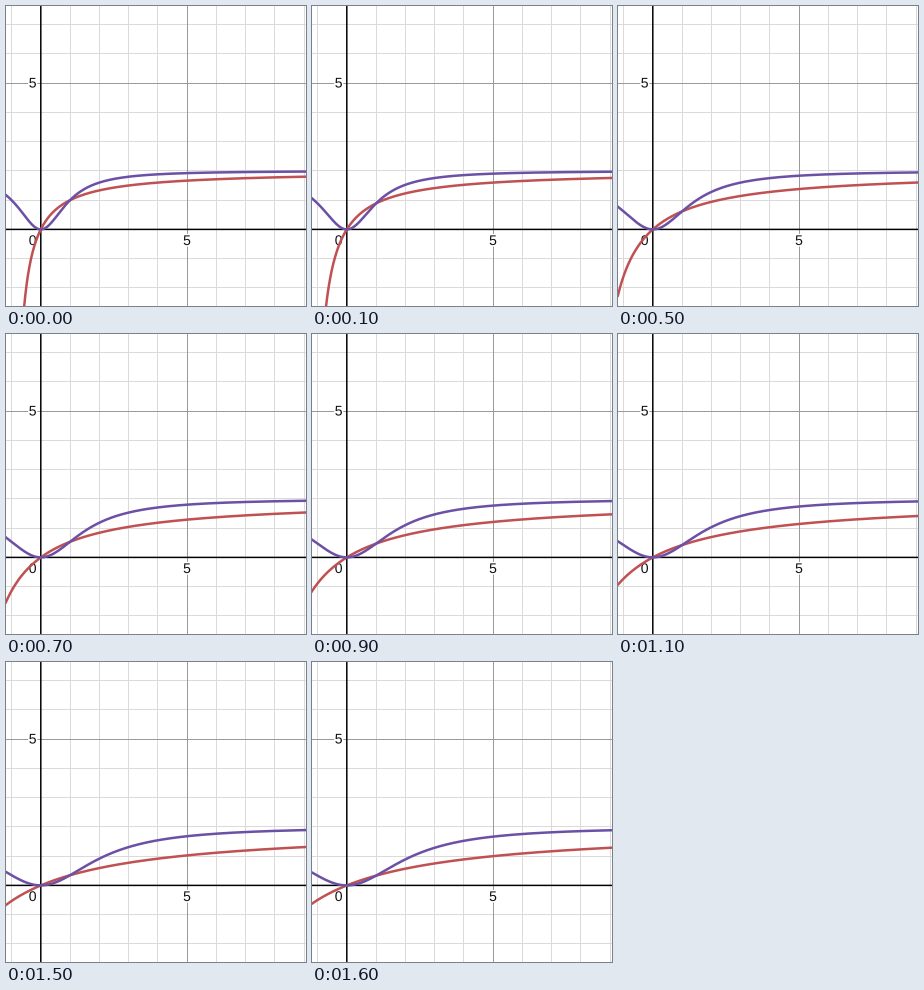
A matplotlib script that plays this animation: 300x300 px, repeating every 1.7 s.

```python
import numpy as np
import matplotlib.pyplot as plt
from matplotlib import patheffects
from matplotlib.animation import FuncAnimation

SIZE, DPI = 300, 100
PX = 72 / DPI                  # points per pixel
X0, Y0, UNIT = 34.8, 223.4, 29.27
FRAMES, INTERVAL = 17, 100
RED, PURPLE = "#c05153", "#6c50a5"

fig = plt.figure(figsize=(SIZE / DPI, SIZE / DPI), dpi=DPI, facecolor="white")
ax = fig.add_axes([0, 0, 1, 1])
ax.set_xlim(0, SIZE)
ax.set_ylim(SIZE, 0)
ax.axis("off")


def grid_line(n, vertical):
    pos = X0 + n * UNIT if vertical else Y0 - n * UNIT
    if n == 0:
        color, width, z = "#000000", 1.5, 3
    else:
        color, width, z = ("#dadada", 1, 1) if n % 5 else ("#9a9a9a", 1, 2)
        pos = np.floor(pos) + 0.5      # centre of a pixel
    ends = [-2, SIZE + 2]
    xy = ([pos, pos], ends) if vertical else (ends, [pos, pos])
    ax.plot(*xy, color=color, lw=width * PX, zorder=z, snap=False)


def label(x, y, text, ha):
    halo = patheffects.withStroke(linewidth=3 * PX, foreground="white")
    ax.text(x, y, text, ha=ha, va="baseline", family="Liberation Sans",
            fontsize=14 * PX, color="#111111", zorder=2.5,
            path_effects=[halo])


for n in range(-1, 10):
    grid_line(n, True)
for n in range(-2, 8):
    grid_line(n, False)

label(X0 + 5 * UNIT - 0.2, 239, "5", "center")
label(30.5, 81.5, "5", "right")
label(30.5, 239, "0", "right")

red, = ax.plot([], [], color=RED, lw=2.5 * PX, zorder=4)
purple, = ax.plot([], [], color=PURPLE, lw=2.5 * PX, zorder=5)
xs = np.linspace(-1.3, 9.2, 1200)


def hill(x, k, power):
    return 2 * x**power / (k + x**power)


def place(line, x, y):
    line.set_data(X0 + x * UNIT, Y0 - y * UNIT)


def update(i):
    k = 1 + 4 * i / (FRAMES - 1)
    right = xs[xs > -k + 0.05]     # only the branch right of the pole
    place(red, right, hill(right, k, 1))
    place(purple, xs, hill(xs, k, 2))
    return red, purple


anim = FuncAnimation(fig, update, frames=FRAMES, interval=INTERVAL,
                     repeat=True, repeat_delay=0)
plt.show()
```
